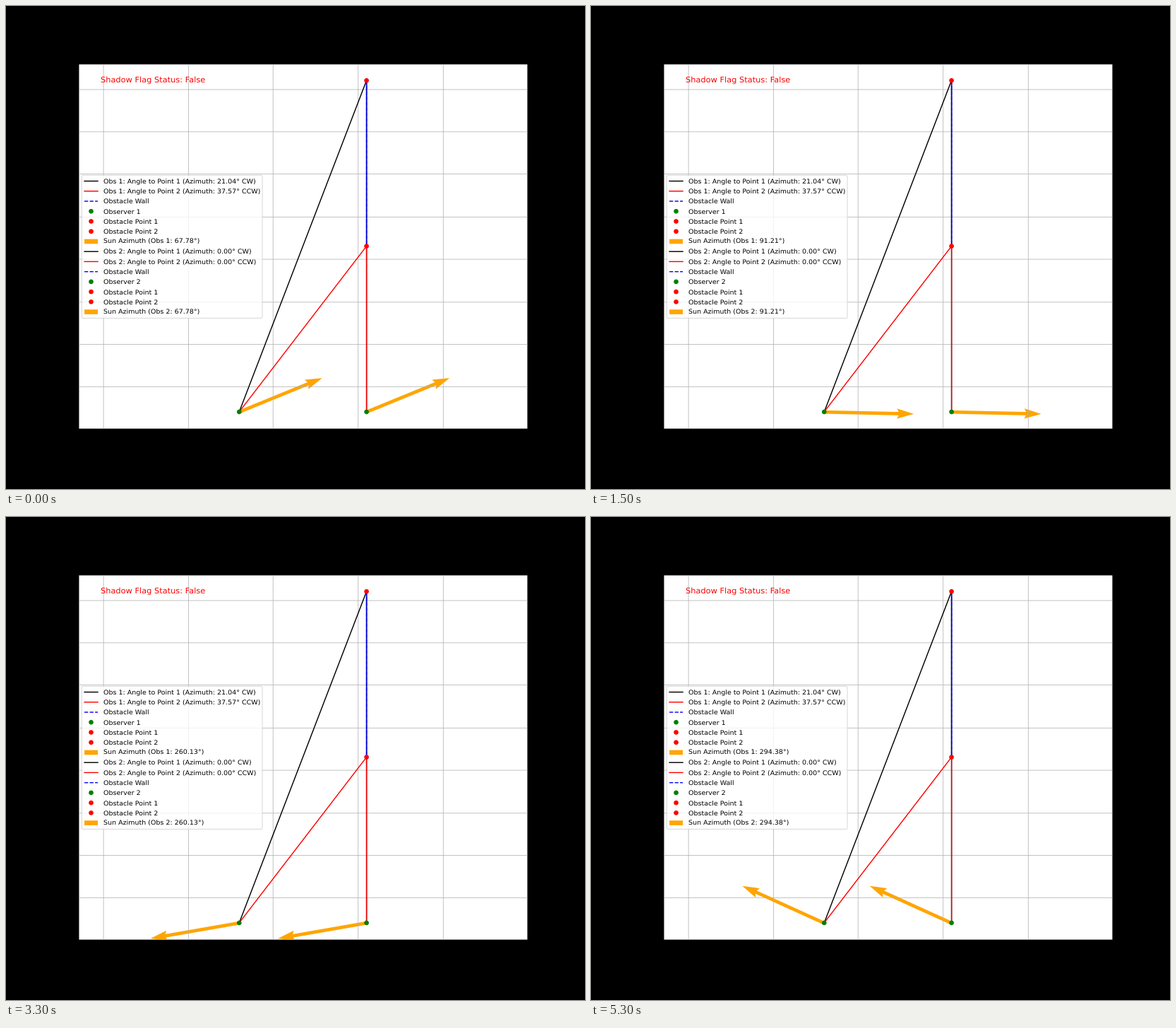
A matplotlib script for the animation above (5400 ms loop, 820 px wide and 683 px high).

```python
import numpy as np
import matplotlib.pyplot as plt
from matplotlib.animation import FuncAnimation
from matplotlib.patches import Circle, FancyBboxPatch, Rectangle

W, H, DPI = 820, 683, 64
FRAMES, INTERVAL = 54, 100

# Layout sheet of 12 x 10 inches at 72 dpi, y pointing down, scaled to the stage
SHEET_W, SHEET_H = 864, 720
K = W / SHEET_W * 72 / DPI        # sheet pixels to points
LEFT, RIGHT, TOP, BOTTOM = 108, 777.6, 86.4, 630
UNIT = (BOTTOM - TOP) / 8.58      # sheet pixels per metre on the map
EM = 10

OBSERVERS = [(0, 0), (3, 0)]
POINT_1, POINT_2 = (3, 7.8), (3, 3.9)

plt.rcParams.update({
    "font.family": "DejaVu Sans",
    "font.size": EM * K,
    "text.hinting": "none",
    "path.snap": False,
    "lines.linewidth": 1.5 * K,
    "patch.linewidth": K,
})


def sun_azimuth(i):
    """Solar azimuth in degrees, one step per quarter of an hour."""
    t = i - 25.8546               # steps from solar noon
    hour = np.radians(3.75 * t)
    decl = 0.34706 - 2.95e-5 * t  # tan(declination) * cos(latitude)
    south = np.arctan2(np.sin(hour), 0.47642 * np.cos(hour) - decl)
    return 180 + np.degrees(south)


def bearing(start, end):
    return np.degrees(np.arctan2(end[0] - start[0], end[1] - start[1]))


def to_sheet(x, y):
    return ((LEFT + RIGHT) / 2 + (x - 1.5) * UNIT,
            BOTTOM - (y + 0.39) * UNIT)


def pixel_center(v):
    return np.floor(v + 0.5) + 0.5


def sun_label(n, azimuth):
    return f"Sun Azimuth (Obs {n}: {azimuth:.2f}°)"


fig = plt.figure(figsize=(W / DPI, H / DPI), dpi=DPI, facecolor="black")
ax = fig.add_axes([0, 0, 1, 1])
ax.set_xlim(0, SHEET_W)
ax.set_ylim(SHEET_H, 0)
ax.axis("off")


def dot(x, y, color, zorder=3):
    ax.add_patch(Circle((x, y), 3.5, color=color, linewidth=0, zorder=zorder))


def segment(a, b, color, style="-"):
    xs, ys = np.round([to_sheet(*a), to_sheet(*b)]).T
    ax.plot(xs, ys, color=color, linestyle=style)


# Map
area = Rectangle((109, 87), 669, 543, facecolor="white", linewidth=0, zorder=0)
ax.add_patch(area)

grid = dict(color="#b0b0b0", linewidth=0.8 * K, zorder=1.5)
for k in range(-2, 3):
    x = pixel_center(to_sheet(0.8 + 2 * k, 0)[0])
    ax.plot([x, x], [87, 630], solid_capstyle="butt", **grid)
for k in range(8):
    y = pixel_center(to_sheet(0, 0.6 + k)[1])
    ax.plot([109, 778], [y, y], solid_capstyle="butt", **grid)

for obs in OBSERVERS:
    segment(obs, POINT_1, "k")
    segment(obs, POINT_2, "r")
segment(POINT_1, POINT_2, "#0000b4")
segment(POINT_1, POINT_2, "b", "--")

for point, color in zip([*OBSERVERS, POINT_1, POINT_2], ["g", "g", "r", "r"]):
    dot(*np.round(to_sheet(*point)), color)

ox, oy = zip(*(to_sheet(*obs) for obs in OBSERVERS))
share = (RIGHT - LEFT) / SHEET_W
arrows = ax.quiver(ox, oy, [0, 0], [1, 1], color="orange", zorder=1,
                   units="width", width=0.0075 * share,
                   scale_units="width", scale=5 / share)
arrows.set_clip_path(area)

ax.text(LEFT + 0.05 * (RIGHT - LEFT), BOTTOM - 0.95 * (BOTTOM - TOP),
        "Shadow Flag Status: False", color="red", fontsize=12 * K)

# Legend
ax.add_patch(FancyBboxPatch(
    (113, 252.3), 269.5, 213, boxstyle="round,pad=0,rounding_size=2",
    facecolor="white", edgecolor="0.8", alpha=0.8, zorder=5))

HANDLE_X, ROW_0, ROW_STEP = 117, 261, 1.5 * EM


def legend_row(row, label, kind, color):
    y = ROW_0 + ROW_STEP * row
    if kind == "patch":
        ax.add_patch(Rectangle((HANDLE_X, y - 0.35 * EM), 2 * EM, 0.7 * EM,
                               facecolor=color, linewidth=0, zorder=6))
    elif kind == "dot":
        dot(HANDLE_X + EM, y, color, zorder=6)
    else:
        ax.plot([HANDLE_X, HANDLE_X + 2 * EM], [y, y],
                color=color, linestyle=kind, zorder=6)
    return ax.text(HANDLE_X + 2.8 * EM, y + 0.35 * EM, label, zorder=6)


sun_texts = []
for k, obs in enumerate(OBSERVERS):
    n = k + 1
    az_1, az_2 = bearing(obs, POINT_1), bearing(obs, POINT_2)
    rows = [
        (f"Obs {n}: Angle to Point 1 (Azimuth: {az_1:.2f}° CW)", "-", "k"),
        (f"Obs {n}: Angle to Point 2 (Azimuth: {az_2:.2f}° CCW)", "-", "r"),
        ("Obstacle Wall", "--", "b"),
        (f"Observer {n}", "dot", "g"),
        ("Obstacle Point 1", "dot", "r"),
        ("Obstacle Point 2", "dot", "r"),
        (sun_label(n, 0), "patch", "orange"),
    ]
    for j, row in enumerate(rows):
        text = legend_row(7 * k + j, *row)
    sun_texts.append(text)


def update(i):
    azimuth = sun_azimuth(i)
    a = np.radians(azimuth)
    arrows.set_UVC([np.sin(a)] * 2, [np.cos(a)] * 2)
    for n, text in enumerate(sun_texts, 1):
        text.set_text(sun_label(n, azimuth))
    return [arrows, *sun_texts]


anim = FuncAnimation(fig, update, frames=FRAMES, interval=INTERVAL,
                     repeat=True, repeat_delay=0, blit=False)
plt.show()
```
